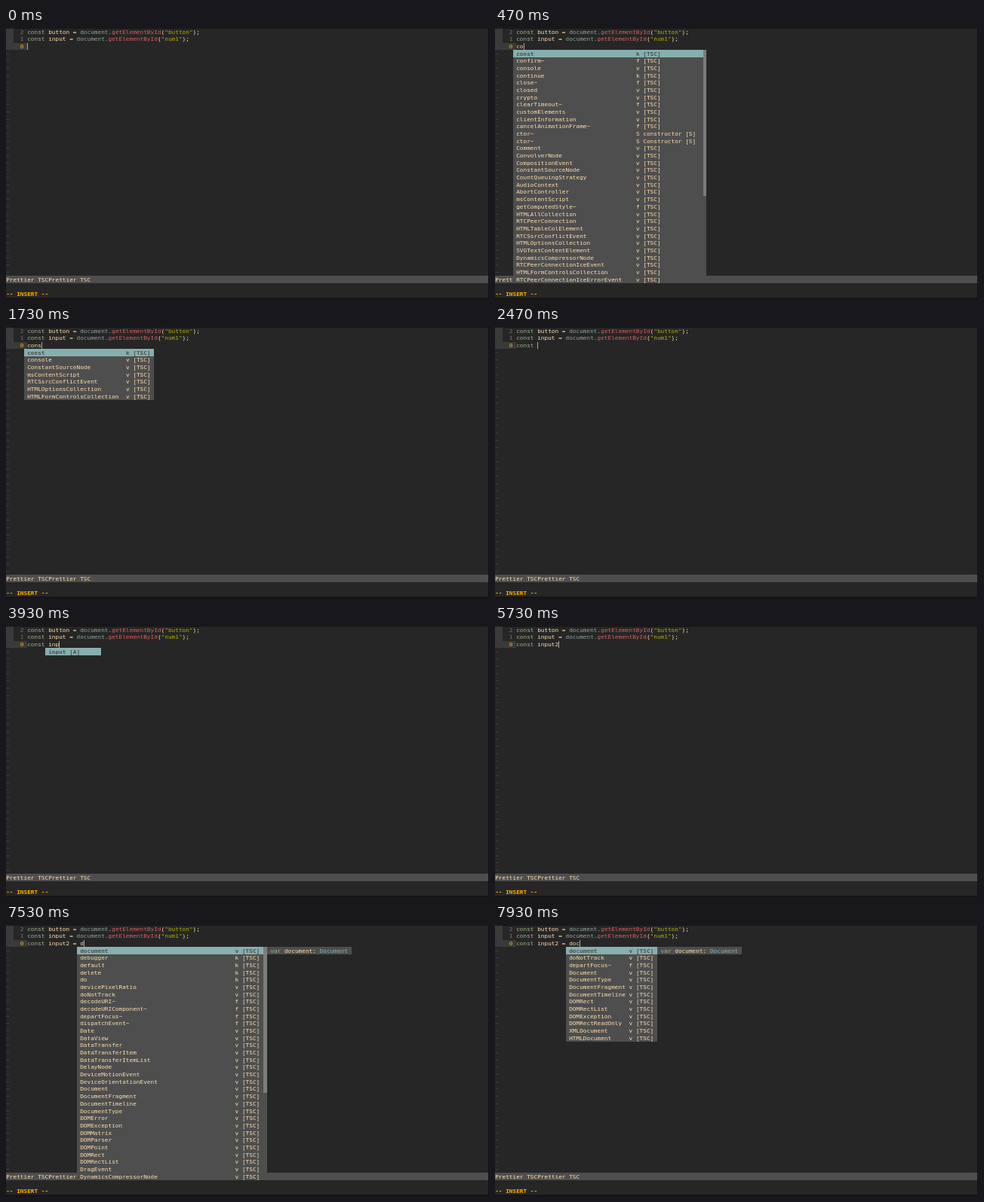
An HTML page with a canvas for the animation above (8 s loop, 640x360 px).

```html
<!DOCTYPE html>
<html lang="en">
<head>
<meta charset="utf-8">
<title>Editor completion</title>
<style>
  html, body { margin: 0; height: 100%; overflow: hidden; background: #262626; }
  canvas { display: block; }
</style>
</head>
<body>
<canvas width="640" height="360"></canvas>
<script>
const ctx = document.querySelector('canvas').getContext('2d');
const LOOP = 8000, CELL_W = 4.667, CELL_H = 9.676, LEFT = 0.2, TOP = 0.2;
const ZOOM = 10, FONT = '77.5px "DejaVu Sans Mono", monospace';
const color = {
  bg: '#262626', gutter: '#3a3a3a', panel: '#4e4e4e', thumb: '#7c7c7c',
  fg: '#ffdfaf', accent: '#ffaf00', select: '#87afaf', number: '#767676',
  keyword: '#9fb08f', object: '#8fa59a', method: '#d75f5f', string: '#afaf00'
};

// Each entry: name, then kind (v if absent) or the full right-hand text.
const list = text => text.split('|').map(entry => {
  const [name, ...rest] = entry.split(' ');
  const info = rest.join(' ') || 'v';
  return [name, info.length > 1 ? info : info + ' [TSC]'];
});

const popups = {
  co: { col: 5, end: 60, info: 40, thumb: 20, items: list(
    'const k|confirm~ f|console|continue k|close~ f|closed|crypto|clearTimeout~ f|' +
    'customElements|clientInformation|cancelAnimationFrame~ f|ctor~ S constructor [S]|' +
    'ctor~ S Constructor [S]|Comment|ConvolverNode|CompositionEvent|ConstantSourceNode|' +
    'CountQueuingStrategy|AudioContext|AbortController|msContentScript|getComputedStyle~ f|' +
    'HTMLAllCollection|RTCPeerConnection|HTMLTableColElement|RTCSsrcConflictEvent|' +
    'HTMLOptionsCollection|SVGTextContentElement|DynamicsCompressorNode|' +
    'RTCPeerConnectionIceEvent|HTMLFormControlsCollection|RTCPeerConnectionIceErrorEvent') },
  con: { col: 5, end: 50, info: 40, thumb: 20, items: list(
    'const k|confirm~ f|console|continue k|clientInformation|cancelAnimationFrame~ f|' +
    'ConvolverNode|ConstantSourceNode|AudioContext|AbortController|msContentScript|' +
    'RTCPeerConnection|RTCSsrcConflictEvent|SVGTextContentElement|RTCPeerConnectionIceEvent|' +
    'HTMLFormControlsCollection|RTCPeerConnectionIceErrorEvent|' +
    'webkitConvertPointFromNodeToPage~ f|webkitConvertPointFromPageToNode~ f|' +
    'DynamicsCompressorNode|Comment|CDATASection|CaretPosition|CSSFontFaceRule|' +
    'CompositionEvent|CSSConditionRule|CSSStyleDeclaration|CountQueuingStrategy|' +
    'CredentialsContainer|CanvasRenderingContext2D|HTMLAllCollection|HTMLTableColElement') },
  cons: { col: 5, end: 42, info: 34, items: list(
    'const k|console|ConstantSourceNode|msContentScript|RTCSsrcConflictEvent|' +
    'HTMLOptionsCollection|HTMLFormControlsCollection') },
  in: { col: 11, end: 60, info: 40, items: list('input [A]|instanceof k|indexedDB') },
  input: { col: 11, end: 27, info: 18, items: list('input [A]') },
  d: { col: 20, end: 74, info: 65, thumb: 20, preview: 98, items: list(
    'document|debugger k|default k|delete k|do k|devicePixelRatio|doNotTrack|' +
    'decodeURI~ f|decodeURIComponent~ f|departFocus~ f|dispatchEvent~ f|Date|DataView|' +
    'DataTransfer|DataTransferItem|DataTransferItemList|DelayNode|DeviceMotionEvent|' +
    'DeviceOrientationEvent|Document|DocumentFragment|DocumentTimeline|DocumentType|' +
    'DOMError|DOMException|DOMMatrix|DOMParser|DOMPoint|DOMRect|DOMRectList|' +
    'DragEvent|DynamicsCompressorNode') },
  doc: { col: 20, end: 46, info: 38, preview: 70, items: list(
    'document|doNotTrack|departFocus~ f|Document|DocumentType|DocumentFragment|' +
    'DocumentTimeline|DOMRect|DOMRectList|DOMException|DOMRectReadOnly|XMLDocument|HTMLDocument') }
};

// Start time, typed line, open popup.
const steps = [
  [0, ''], [70, 'c'], [270, 'c', 'co'], [400, 'co', 'co'],
  [800, 'con'], [870, 'con', 'con'],
  [1670, 'cons'], [1730, 'cons', 'cons'], [2070, 'const', 'cons'], [2270, 'const '],
  [3670, 'const i'], [3730, 'const in', 'in'], [3870, 'const inp'], [3930, 'const inp', 'input'],
  [4930, 'const inpu', 'input'], [5070, 'const input', 'input'], [5730, 'const input2'],
  [6000, 'const input2 '], [6600, 'const input2 ='], [6800, 'const input2 = '],
  [7200, 'const input2 = d'], [7400, 'const input2 = d', 'd'],
  [7670, 'const input2 = do', 'd'], [7800, 'const input2 = doc'], [7930, 'const input2 = doc', 'doc']
];

const colX = col => LEFT + col * CELL_W;
const rowY = row => TOP + row * CELL_H;

function box(col, row, cols, rows, fill) {
  ctx.fillStyle = fill;
  const x = Math.round(colX(col)), y = Math.round(rowY(row));
  ctx.fillRect(x, y, Math.round(colX(col + cols)) - x, Math.round(rowY(row + rows)) - y);
}

function write(text, col, row, fill, bold) {
  ctx.save();
  ctx.translate(colX(col), rowY(row) + 7.4);
  ctx.scale(1 / ZOOM, 1 / ZOOM);
  ctx.font = (bold ? 'bold ' : '') + FONT;
  ctx.fillStyle = fill;
  ctx.fillText(text, 0, 0);
  ctx.restore();
}

function writeParts(col, row, parts) {
  for (const [text, fill] of parts) {
    write(text, col, row, fill);
    col += text.length;
  }
}

function drawLookup(row, name, id) {
  writeParts(6, row, [
    ['const', color.keyword], [` ${name} = `, color.fg], ['document', color.object],
    ['.', color.keyword], ['getElementById', color.method], ['(', color.fg],
    [`"${id}"`, color.string], [');', color.fg]
  ]);
}

function drawPopup({ col, end, info, thumb, preview, items }) {
  const first = 3;
  box(col, first, end - col, items.length, color.panel);
  box(col, first, end - col - (thumb ? 1 : 0), 1, color.select);
  if (thumb) box(end - 1, first, 1, thumb, color.thumb);
  items.forEach(([name, detail], i) => {
    const fill = i ? color.fg : color.panel;
    write(name, col + 1, first + i, fill, !i);
    write(detail, info, first + i, fill, !i);
  });
  if (preview) {
    box(end, first, preview - end, 1, color.panel);
    writeParts(end + 1, first, [
      ['var', color.keyword], [' document: ', color.fg], ['Document', color.select]
    ]);
  }
}

function drawEditor(typed) {
  ctx.fillStyle = color.bg;
  ctx.fillRect(0, 0, 640, 360);
  box(0, 0, 2, 3, color.gutter);
  box(0, 2, 6, 1, color.gutter);
  write('2', 4, 0, color.number);
  write('1', 4, 1, color.number);
  write('0', 4, 2, color.accent);
  drawLookup(0, 'button', 'button');
  drawLookup(1, 'input', 'num1');
  for (let row = 3; row < 34; row++) write('~', 0, row, color.panel);

  const keyword = typed.startsWith('const') ? 'const' : '';
  writeParts(6, 2, [[keyword, color.keyword], [typed.slice(keyword.length), color.fg]]);
  ctx.fillStyle = '#a8a8a8';
  ctx.fillRect(Math.round(colX(6 + typed.length)), 20, 1, 9);

  ctx.fillStyle = color.panel;
  ctx.fillRect(0, 329, 640, 10);
  write('Prettier TSCPrettier TSC', 0, 34, color.fg);
  write('-- INSERT --', 0, 36, color.accent, true);
  ctx.fillStyle = '#111';
  ctx.fillRect(0, 0, 640, 0.7);
  ctx.fillRect(0, 358.5, 640, 1.5);
  ctx.fillRect(639, 0, 1, 360);
}

function frame() {
  const time = performance.now() % LOOP;
  const [, typed, popup] = steps.findLast(([start]) => start <= time);
  drawEditor(typed);
  if (popup) drawPopup(popups[popup]);
  requestAnimationFrame(frame);
}
frame();
</script>
</body>
</html>
```
